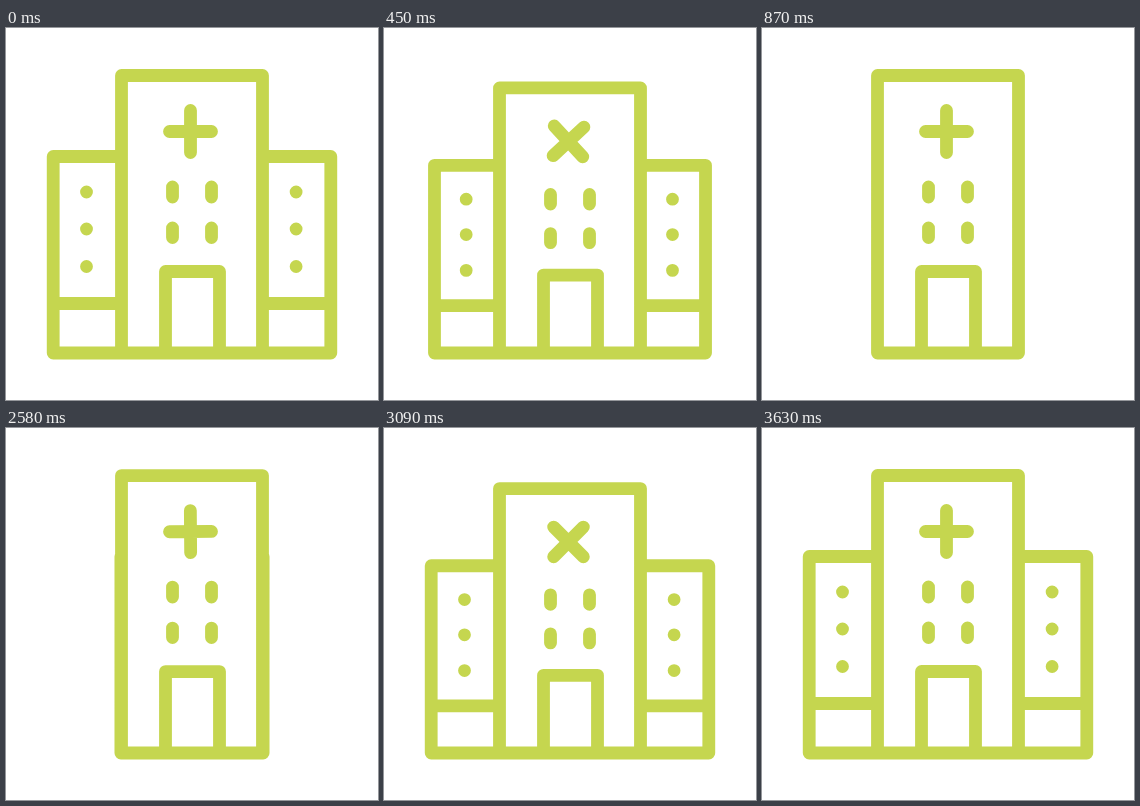
Recreate the animation shown at these times as an HTML page. Size 372 by 372 pixels, loop 5400 ms.

```html
<!DOCTYPE html>
<html lang="en">
<head>
<meta charset="utf-8">
<title>Hospital</title>
<style>
  html, body { margin: 0; height: 100%; overflow: hidden; background: #fff; }
  svg { display: block; width: 100%; height: 100%; }
  path { fill: none; stroke: #c5d64f; stroke-width: 12.8; stroke-linecap: round; stroke-linejoin: round; }
</style>
</head>
<body>
<svg viewBox="0 0 372 372">
  <path id="building"/>
  <path id="cross" d="M-21 0H21M0 -21V21"/>
</svg>
<script>
const LOOP = 5400, STEP = 30;
const GROUND = 325, LEFT = 115.5, RIGHT = 256.5;
const WING_WIDTH = 68.3, SQUASH = 0.047;
const building = document.getElementById('building');
const cross = document.getElementById('cross');

// Cubic-bezier easing (1/3, 0, x2, 1), solved by bisection.
function ease(p, x2 = 2 / 3) {
  let low = 0, high = 1;
  for (let i = 0; i < 24; i++) {
    const s = (low + high) / 2, r = 1 - s;
    if (r * r * s + 3 * x2 * r * s * s + s ** 3 < p) low = s; else high = s;
  }
  return low * low * (3 - 2 * low);
}

function ramp(t, start, end, x2) {
  const p = (t - start) / (end - start);
  return p <= 0 ? 0 : p >= 1 ? 1 : ease(p, x2);
}

function draw(t) {
  const retract = ramp(t, 390, 870, 0.5);
  const extend = ramp(t, 2550, 3090);
  const squash = ramp(t, 0, 390) - retract + extend - ramp(t, 3090, 3630);
  const spread = 1 - retract + extend;

  const y = v => GROUND - (GROUND - v) * (1 - SQUASH * squash);
  const line = (x1, y1, x2, y2) => `M${x1} ${y(y1)}L${x2} ${y(y2)}`;
  const arch = (x1, x2, top) => `M${x1} ${GROUND}V${y(top)}H${x2}V${GROUND}`;
  const dot = (x, v) => `M${x} ${y(v)}h.01`;

  const wing = (wall, side, dotOffset) => {
    const outer = wall + side * WING_WIDTH * spread;
    const dotX = wall + side * dotOffset * spread;
    return arch(wall, outer, 128.5) + 'Z' + line(wall, 275.5, outer, 275.5) +
      [164, 201, 238.5].map(v => dot(dotX, v)).join('');
  };
  const windows = [166.5, 205.5].map(x =>
    line(x, 159, x, 169) + line(x, 200, x, 209.5)).join('');

  building.setAttribute('d',
    arch(LEFT, RIGHT, 47.5) + 'Z' + arch(159.5, 213.5, 243.5) + windows +
    wing(LEFT, -1, 35) + wing(RIGHT, 1, 33.6));
  cross.setAttribute('transform', `translate(184.5 ${y(103.5)}) rotate(${-45 * squash})`);
}

function frame() {
  const t = performance.now() % LOOP;
  draw(Math.floor(t / STEP) * STEP);
  requestAnimationFrame(frame);
}
frame();
</script>
</body>
</html>
```
